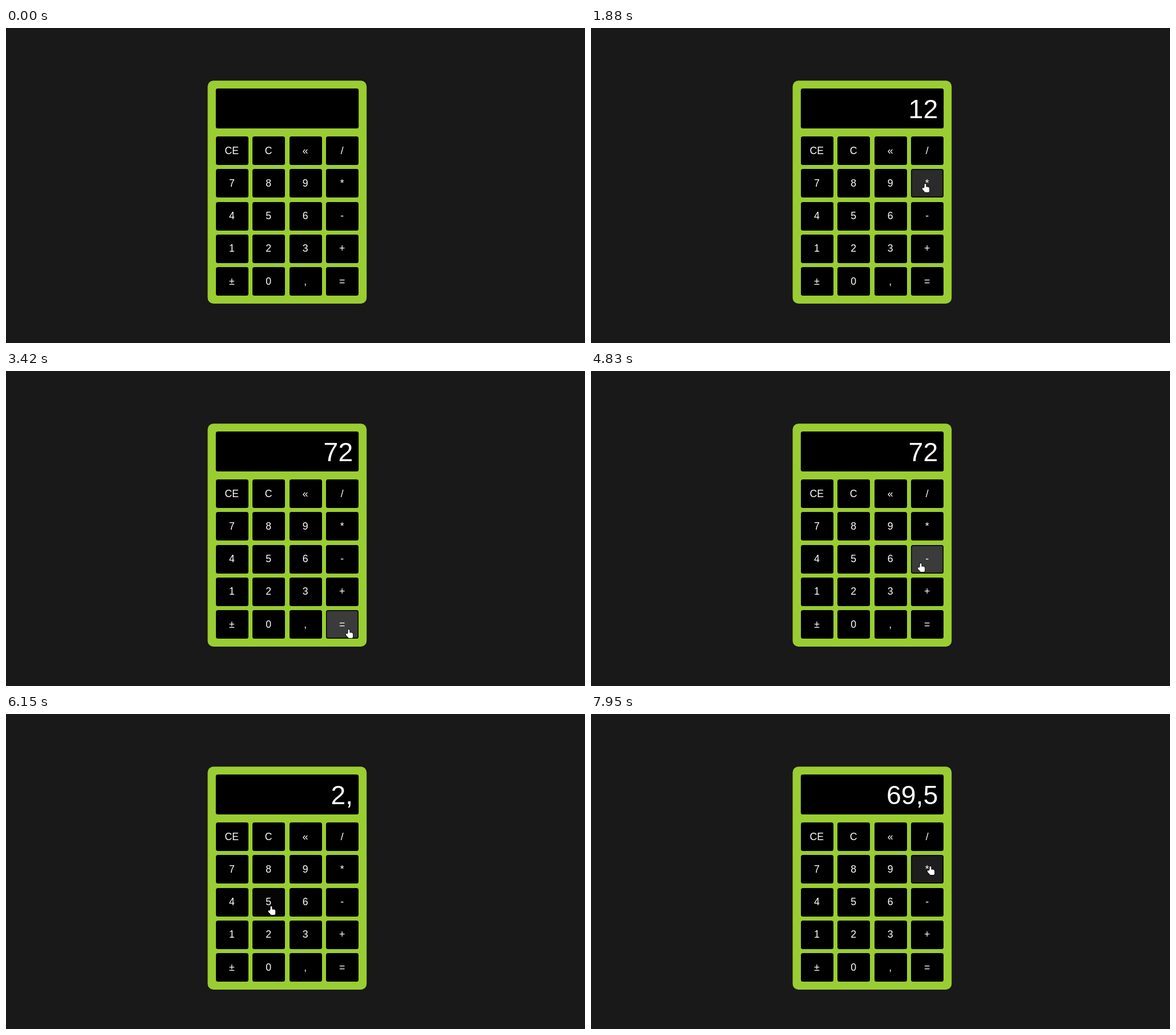
An HTML page with a canvas that plays this animation: 1015x552 px, repeating every 8000 ms.

```html
<!DOCTYPE html>
<html lang="en">
<head>
<meta charset="utf-8">
<title>Calculator</title>
<style>
html, body { margin: 0; width: 100%; height: 100%; overflow: hidden; background: #191919; }
canvas { display: block; }
</style>
</head>
<body>
<canvas id="stage" width="1015" height="552"></canvas>
<script>
const ctx = document.getElementById('stage').getContext('2d');
const LOOP = 8000, PRESS_DELAY = 200, FADE = 200, HOVER_GRAY = 59;
const FONT = '"Liberation Sans", Arial, sans-serif';
const LABELS = [...'CE C « / 7 8 9 * 4 5 6 - 1 2 3 + ± 0 , ='.split(' ')];
const KEY_W = 57, KEY_H = 50;

// Pointer stops: key pressed there (if any), x, y, arrival, departure.
const STOPS = [
  ['', 779, 330, 200, 200],
  ['1', 388, 395, 760, 1040],
  ['2', 455, 389, 1255, 1600],
  ['*', 586, 273, 1755, 2160],
  ['6', 525, 335, 2600, 2860],
  ['=', 601, 453, 3200, 4350],
  ['-', 578, 337, 4700, 4900],
  ['2', 461, 396, 5110, 5520],
  [',', 523, 445, 5750, 5940],
  ['5', 465, 337, 6150, 6500],
  ['=', 613, 447, 6720, 6860],
  ['', 600, 450, 7070, 7600],
  ['*', 595, 267, 7890, LOOP]
].map(([key, x, y, arrive, leave]) => ({ key, x, y, arrive, leave }));

const OPS = {
  '+': (a, b) => a + b,
  '-': (a, b) => a - b,
  '*': (a, b) => a * b,
  '/': (a, b) => a / b
};

const keys = LABELS.map((text, i) => {
  const col = i % 4, row = Math.floor(i / 4);
  return {
    text,
    x: Math.round(367.6 + col * 64.45),
    y: Math.round(190.2 + row * 57.15),
    textX: 395.8 + col * 64.45,
    baseline: Math.round(220.9 + row * 57.15)
  };
});

const ease = k => k * k * (3 - 2 * k);
const mix = (a, b, k) => a + (b - a) * k;
const toNumber = text => Number(text.replace(',', '.'));
const toText = number => String(number).replace('.', ',');

function pointerAt(t) {
  const i = STOPS.findLastIndex(s => s.arrive <= t);
  if (i < 0) return null;
  const a = STOPS[i], b = STOPS[i + 1];
  if (!b || t <= a.leave) return a;
  const k = ease((t - a.leave) / (b.arrive - a.leave));
  return { x: mix(a.x, b.x, k), y: mix(a.y, b.y, k) };
}

function keyAt(p) {
  return p && keys.find(k => p.x >= k.x && p.x < k.x + KEY_W && p.y >= k.y && p.y < k.y + KEY_H);
}

// Replays every press up to time t and returns the display text.
function readout(t) {
  let shown = '', stored = 0, op = null, fresh = true;
  for (const { key, arrive } of STOPS) {
    if (!key || arrive + PRESS_DELAY > t) continue;
    if (key === '=') {
      shown = toText(OPS[op](stored, toNumber(shown)));
      fresh = true;
    } else if (OPS[key]) {
      stored = toNumber(shown);
      op = key;
      fresh = true;
    } else {
      shown = fresh ? key : shown + key;
      fresh = false;
    }
  }
  return shown;
}

// A key lights up while the pointer stays on it and resets when it leaves.
function hoverLevel(key, t) {
  let held = 0;
  while (held < FADE && keyAt(pointerAt(t - held)) === key) held += 5;
  return (held / FADE) ** 2;
}

function box(x, y, w, h, r, color) {
  ctx.fillStyle = color;
  ctx.beginPath();
  ctx.roundRect(x, y, w, h, r);
  ctx.fill();
}

function label(text, x, y, size, align) {
  ctx.fillStyle = '#fff';
  ctx.font = `${size}px ${FONT}`;
  ctx.textAlign = align;
  ctx.fillText(text, x, y);
}

function handShape() {
  const shape = new Path2D();
  shape.roundRect(-1.4, 0, 2.8, 10, 1.4);
  shape.roundRect(-2.2, 5.4, 9.4, 9.6, [1, 3, 2.5, 3.5]);
  const thumb = new Path2D();
  thumb.ellipse(-3, 9.8, 1.6, 3, -0.6, 0, Math.PI * 2);
  shape.addPath(thumb);
  return shape;
}

const HAND = handShape();
const ARROW = new Path2D('M0 0V15L3.5 11.8L5.7 16.6L7.8 15.6L5.7 11H10.5Z');

function drawPointer({ x, y }, shape) {
  ctx.save();
  ctx.translate(x, y);
  ctx.strokeStyle = '#000';
  ctx.lineWidth = 1.8;
  ctx.lineJoin = 'round';
  ctx.stroke(shape);
  ctx.fillStyle = '#fff';
  ctx.fill(shape);
  ctx.restore();
}

function draw(t) {
  const pointer = pointerAt(t);
  const hot = keyAt(pointer);

  ctx.fillStyle = '#191919';
  ctx.fillRect(0, 0, 1015, 552);
  box(353.5, 92.2, 278.7, 390.8, 10, '#9acd32');
  box(367.8, 106, 250.4, 70, 3.5, '#000');
  label(readout(t), 608.2, 158, 46.4, 'right');

  for (const key of keys) {
    box(key.x, key.y, KEY_W, KEY_H, 3.5, '#000');
    if (key === hot) {
      const v = Math.round(HOVER_GRAY * hoverLevel(key, t));
      box(key.x + 1.4, key.y + 1.4, KEY_W - 2.8, KEY_H - 2.8, 2, `rgb(${v},${v},${v})`);
    }
    label(key.text, key.textX, key.baseline, 17.7, 'center');
  }

  if (pointer) drawPointer(pointer, hot ? HAND : ARROW);
}

const origin = performance.now();
function tick() {
  draw((performance.now() - origin) % LOOP);
  requestAnimationFrame(tick);
}
tick();
</script>
</body>
</html>
```
